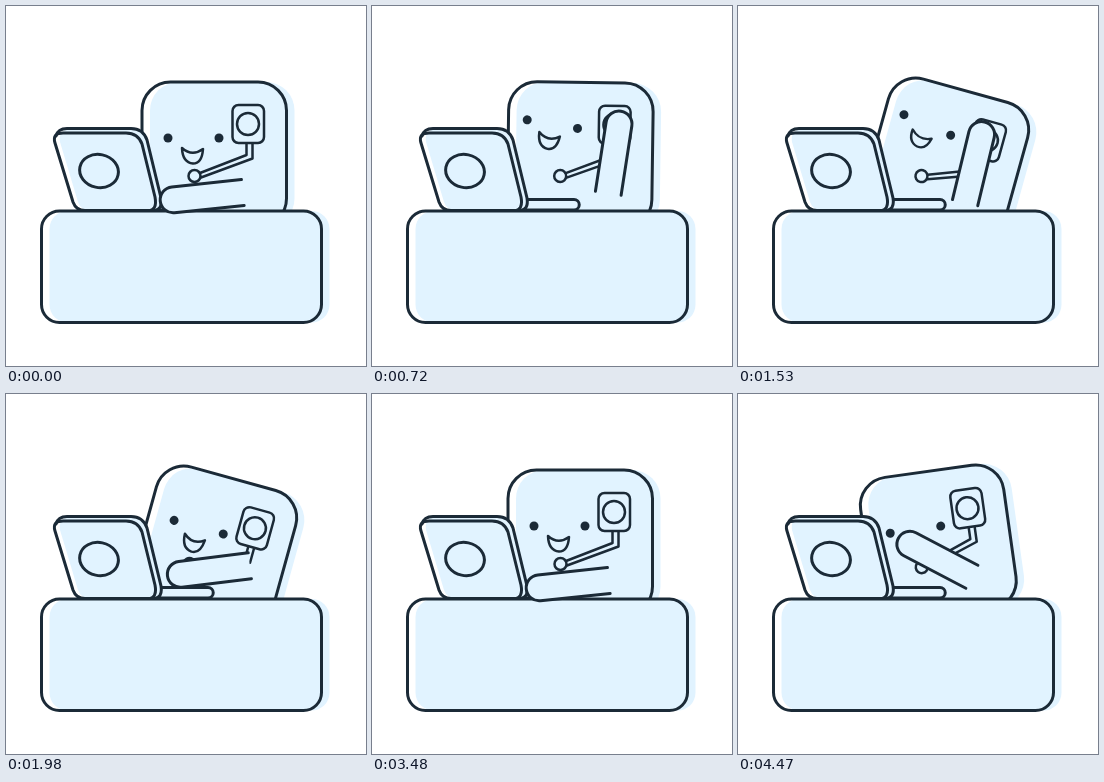
Animation of 360x360 px, one loop 4.5 s. Source, as an HTML page:

```html
<!DOCTYPE html>
<html lang="en">
<head>
<meta charset="utf-8">
<title>Desk helper</title>
<style>
  html, body { margin: 0; width: 100%; height: 100%; overflow: hidden; background: #fff; }
  svg { display: block; width: 100vw; height: 100vh; }
  .line { fill: none; stroke: #1b2a37; stroke-width: 3; stroke-linecap: round; stroke-linejoin: round; }
  .thin { stroke-width: 2.5; }
  .tint { fill: #e1f3ff; }
  .white { fill: #fff; }
  .ink { fill: #1b2a37; }
</style>
</head>
<body>
<svg viewBox="0 0 360 360">
  <defs>
    <path id="lid" d="M61 122.5H125Q137 122.5 141 134L155 192Q157 204.5 147 204.5H79Q70 204.5 67 196L49 136Q47 123 61 122.5Z"/>
    <clipPath id="lidClip"><use href="#lid"/></clipPath>
    <rect id="head" x="136" y="76" width="144.5" height="145" rx="28.5"/>
    <rect id="desk" x="35.5" y="205" width="280" height="111.5" rx="18"/>
  </defs>

  <g id="body">
    <use href="#head" class="white"/>
    <use href="#head" class="tint" x="8"/>
    <use href="#head" class="line"/>
    <g id="face">
      <circle class="ink" cx="162" cy="132" r="4.5"/>
      <circle class="ink" cx="213" cy="132" r="4.5"/>
      <path id="mouth" class="line thin" d="M176 142Q186 151 197 143Q196 157.500 187 157.500Q176.500 156.500 176 142Z"/>
    </g>
    <path class="line thin" d="M240.500 138V149L194 167M246.500 138V152.500L195 171.500"/>
    <circle class="line thin" cx="188.500" cy="170" r="6"/>
    <rect class="line thin" x="226.500" y="99" width="31.500" height="38" rx="6"/>
    <circle class="line thin" cx="242" cy="118" r="11"/>
  </g>

  <path class="line" style="fill:#e1f3ff" d="M150 193.500H202a5.250 5.250 0 0 1 0 10.500H150"/>

  <use href="#lid" class="white"/>
  <g clip-path="url(#lidClip)"><use href="#lid" class="tint" x="5"/></g>
  <path class="line" d="M50 130Q52 122.500 61 122.500H125Q137 122.500 141 134L155 192Q157 204.500 147 204.500"/>
  <path class="line" d="M57 127H120Q132 127 136 138L149 191Q151.500 204.500 142 204.500H79Q70 204.500 67 196L49 137Q46 127 57 127Z"/>
  <ellipse class="line" cx="93" cy="165" rx="19.500" ry="16.500" transform="rotate(12 93 165)"/>

  <use href="#desk" class="white"/>
  <use href="#desk" class="tint" x="8"/>
  <use href="#desk" class="line"/>

  <g id="armBase"><g id="arm">
    <path class="line" style="fill:#e1f3ff" d="M0 -13H-70a13 13 0 0 0 0 26H0"/>
  </g></g>
</svg>
<script>
const LOOP = 4500, STEP = 30, LEAD = 300;
const HOME_X = 208.5, HOME_Y = 148.5, PIVOT = 57;

const rad = deg => deg * Math.PI / 180;

// Smooth 0 to 1 between two times
function ease(t, from, to) {
  const p = Math.min(1, Math.max(0, (t - from) / (to - from)));
  return p * p * (3 - 2 * p);
}

function poseAt(t) {
  const settle = ease(t, 1980, 2510);
  const lower = ease(t, 1440, 1950);
  const tilt = -16 * ease(t, -LEAD, 240) + 31.5 * ease(t, 114, 1274) - 15.5 * settle;
  const left = rad(Math.min(tilt, 0)), right = Math.max(tilt, 0);
  return {
    tilt,
    // Leaning left swings about the base; leaning right sinks
    x: HOME_X + PIVOT * Math.sin(left),
    y: HOME_Y + PIVOT * (1 - Math.cos(left)) + 0.4 * right,
    look: ease(t, 220, 760) - lower,
    turn: -6 + 104 * ease(t, -LEAD, 323) - 120.5 * lower + 16.5 * settle,
    reach: lower - settle
  };
}

const part = id => document.getElementById(id);
const [body, face, mouth, armBase, arm] = ["body", "face", "mouth", "armBase", "arm"].map(part);
const set = (el, value) => el.setAttribute("transform", value);

function draw(ms) {
  const t = Math.floor(ms % LOOP / STEP) * STEP;
  // The loop opens on one resting step, then cuts into the swing
  const when = t === 0 ? -LEAD : t >= LOOP - LEAD ? t - LOOP : t;
  const { tilt, x, y, look, turn, reach } = poseAt(when);
  const place = `translate(${x} ${y}) rotate(${tilt})`;
  const smile = 1 - 1.4 * look * (1 - look);
  set(body, `${place} translate(${-HOME_X} ${-HOME_Y})`);
  set(face, `translate(${-7.7 * look} ${-14 * look}) rotate(${9 * look} 187.5 132)`);
  set(mouth, `translate(0 ${142 * (1 - smile)}) scale(1 ${smile})`);
  set(armBase, place);
  set(arm, `translate(${28.3 + 10.3 * reach} ${38 - 31 * reach}) rotate(${turn})`);
}

function tick() {
  draw(performance.now());
  requestAnimationFrame(tick);
}
tick();
</script>
</body>
</html>
```
